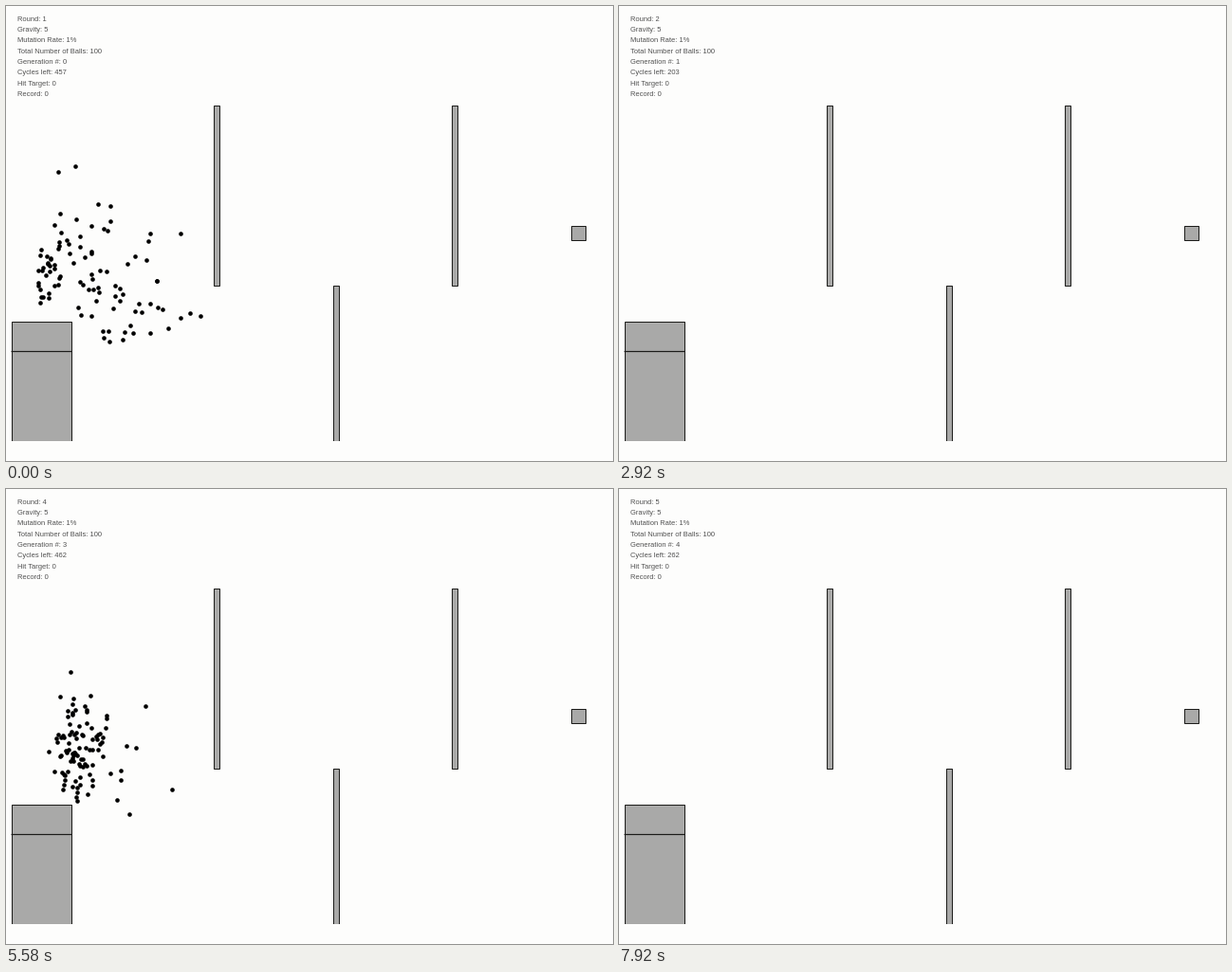
Recreate the animation shown at these times as a matplotlib script. Size 640 by 480 pixels, loop 8 s.

```python
import numpy as np
import matplotlib.pyplot as plt
from matplotlib.animation import FuncAnimation
from matplotlib.patches import Rectangle

W, H = 640, 480
FRAMES, LOOP_MS = 96, 8000
ROUNDS, CYCLES, BALLS = 5, 500, 100
GRAVITY = 0.05        # pixels per cycle squared
START_X, START_Y = 36.5, 330
GROUND = 459

BG, FILL, EDGE, INK = "#fdfdfc", "#a9a9a8", "#1c1c1a", "#505050"

# left, top, width, height
BOX = (5, 332, 63, GROUND - 332)
BARS = [(218, 104, 6, 190), (344, 294, 6, GROUND - 294), (469, 104, 6, 190)]
TARGET = (595, 231, 15, 15)


def launch(generation):
    """Random shots at first, then a narrower cloud bred from the survivors."""
    rng = np.random.default_rng(20 + generation)
    if generation == 0:
        speed = rng.triangular(1.0, 2.3, 5.1, BALLS)
        angle = np.radians(92 - 80 * rng.random(BALLS) ** 1.4)
        return speed * np.cos(angle), -speed * np.sin(angle)
    vx = (1.0 + 0.04 * generation) * np.exp(rng.normal(0, 0.42, BALLS))
    vy = rng.normal(-2.43, 0.75, BALLS)
    return vx, np.clip(vy, -5, -0.6)


def inside(x, y, rect, pad=0):
    left, top, w, h = rect
    return ((x > left - pad) & (x < left + w + pad)
            & (y > top - pad) & (y < top + h + pad))


def fly(vx, vy):
    """Return positions per cycle and whether each ball is still in play."""
    t = np.arange(CYCLES)[:, None]
    x = START_X + vx * t
    y = START_Y + vy * t + GRAVITY / 2 * t ** 2
    hit = (y > GROUND) | (x < 0) | (x > W) | inside(x, y, BOX)
    for rect in BARS + [TARGET]:
        hit |= inside(x, y, rect, 2)
    alive = ~np.maximum.accumulate(hit, axis=0)
    return np.stack([x, y], axis=2), alive


flights = [fly(*launch(generation)) for generation in range(ROUNDS)]


def elapsed_cycles(frame):
    ticks = [2, 17, 35, 47, 56, 74, 95]
    cycles = [43, 367, 797, 1082, 1298, 1730, 2238]
    return int(round(np.interp(frame, ticks, cycles)))


fig = plt.figure(figsize=(6.4, 4.8), dpi=100, facecolor=BG)
ax = fig.add_axes([0, 0, 1, 1])
ax.set(xlim=(0, W), ylim=(H, 0))
ax.axis("off")


def px(size):
    return size * 72 / fig.dpi


def block(rect):
    left, top, w, h = rect
    ax.add_patch(Rectangle((left + 0.5, top + 0.5), w, h, facecolor=FILL,
                           edgecolor=EDGE, linewidth=px(1)))


for rect in [BOX, *BARS, TARGET]:
    block(rect)
ax.plot([5, 69], [363.5, 363.5], color=EDGE, lw=px(1.2), solid_capstyle="butt")
# The ground hides the lower edge of whatever stands on it.
ax.add_patch(Rectangle((0, GROUND), W, H - GROUND, facecolor=BG, linewidth=0,
                       zorder=2.5))

balls = ax.scatter([], [], s=px(4.6) ** 2, c="black", linewidths=0, zorder=3)
labels = [ax.text(12, 15.6 + 11.35 * i, "", color=INK, fontsize=px(7.45),
                  family="Liberation Sans", va="baseline") for i in range(8)]


def draw(frame):
    generation, cycle = divmod(elapsed_cycles(frame), CYCLES)
    path, alive = flights[generation]
    balls.set_offsets(path[cycle][alive[cycle]])
    lines = [f"Round: {generation + 1}", "Gravity: 5", "Mutation Rate: 1%",
             f"Total Number of Balls: {BALLS}", f"Generation #: {generation}",
             f"Cycles left: {CYCLES - cycle}", "Hit Target: 0", "Record: 0"]
    for label, text in zip(labels, lines):
        label.set_text(text)
    return [balls, *labels]


anim = FuncAnimation(fig, draw, frames=FRAMES, interval=LOOP_MS / FRAMES,
                     repeat=True, repeat_delay=0, blit=False)
plt.show()
```
